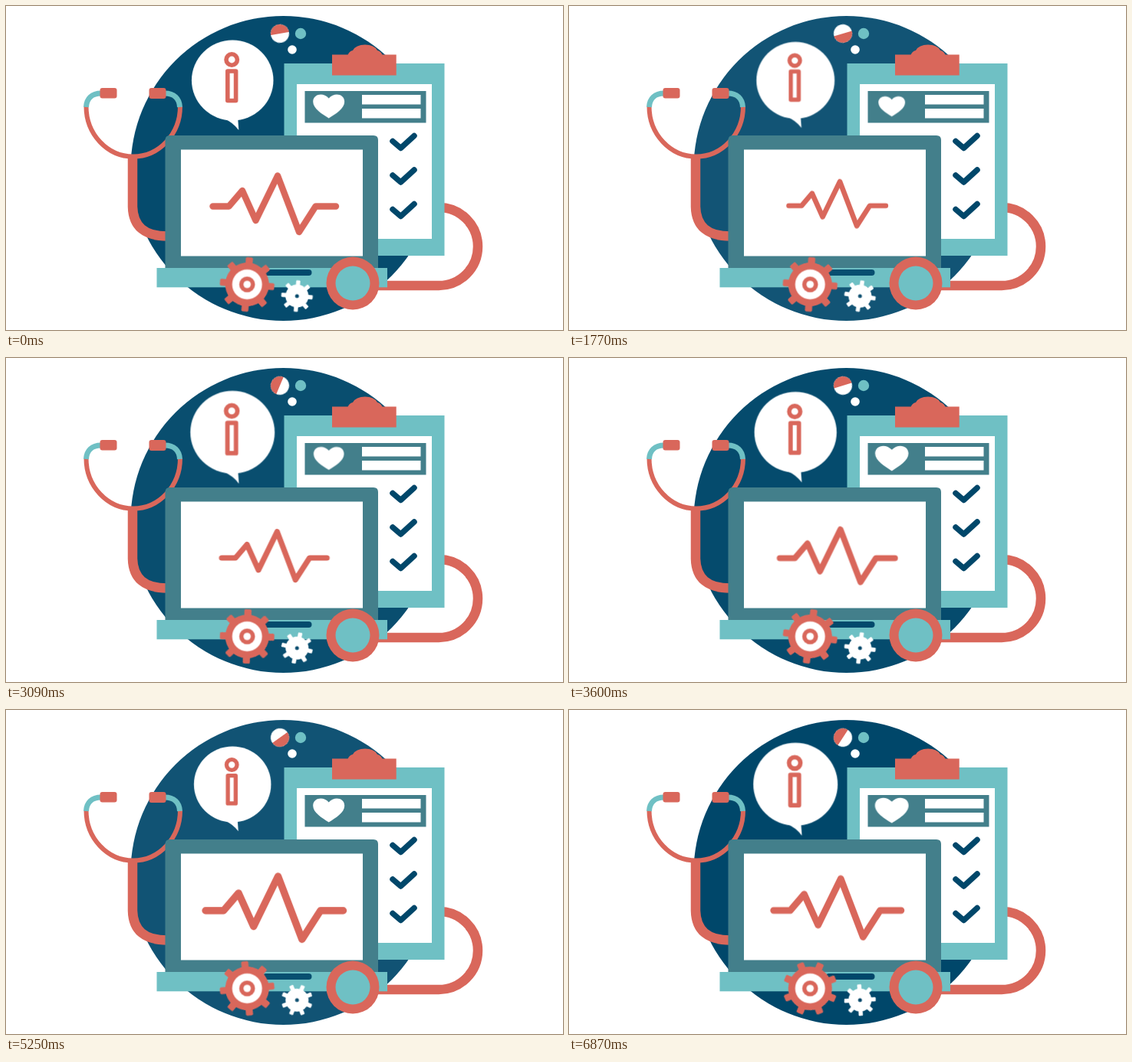
Recreate the animation shown at these times as an HTML page. Size 726 by 423 pixels, loop 6900 ms.

```html
<!DOCTYPE html>
<html lang="en">
<head>
<meta charset="utf-8">
<title>Online health check</title>
<style>
  :root {
    --navy: #00476a;
    --teal: #6fc0c4;
    --slate: #437f8b;
    --red: #d9675b;
    --loop: 6900ms;
  }
  html, body { margin: 0; width: 100%; height: 100%; overflow: hidden; background: #fff; }
  svg { display: block; width: 726px; height: 423px; }

  .navy { fill: var(--navy); }
  .teal { fill: var(--teal); }
  .slate { fill: var(--slate); }
  .red { fill: var(--red); }
  .white { fill: #fff; }
  .line { fill: none; stroke: var(--red); stroke-linecap: round; stroke-linejoin: round; }
  .tube { fill: none; stroke: var(--red); stroke-width: 12.5; }

  /* Moving parts */
  .fade { animation: fade calc(var(--loop) / 2) linear infinite; }
  .bubble { transform-origin: 295px 97px; animation: breathe var(--loop) infinite; }
  .heart { transform-origin: 420.7px 131px; animation: beat calc(var(--loop) / 9) linear infinite; }
  .pulse { transform-origin: 349.5px 258px; animation: pulse var(--loop) linear infinite; }
  .spin { animation: spin var(--loop) linear infinite; }
  .pill { --from: -10deg; --to: 666deg; }
  .big { --from: 5deg; --to: 701deg; }
  .small { --from: 5deg; --to: -681deg; }

  @keyframes spin {
    from { transform: rotate(var(--from)); }
    to { transform: rotate(var(--to)); }
  }
  @keyframes fade {
    0% { opacity: .98; }
    4.3% { opacity: .98; }
    25.2% { opacity: .896; }
    27.8% { opacity: .87; }
    52.2% { opacity: .93; }
    73.9% { opacity: .905; }
    99.1% { opacity: 1; }
    100% { opacity: .98; }
  }
  @keyframes breathe {
    0% { transform: scale(1); animation-timing-function: cubic-bezier(.3, .47, .6, 1); }
    16.7% { transform: scale(.93); animation-timing-function: cubic-bezier(.37, 0, .63, 1); }
    43.3% { transform: scale(1.032); animation-timing-function: cubic-bezier(.37, 0, .63, 1); }
    69.9% { transform: scale(.93); animation-timing-function: cubic-bezier(.37, 0, .63, 1); }
    96.4%, 100% { transform: scale(1.032); }
  }
  @keyframes beat {
    0% { transform: scale(1); }
    25.2% { transform: scale(.73); }
    32.6% { transform: scale(.88); }
    63.5% { transform: scale(1.146); }
    69.6% { transform: scale(1.06); }
    84.8% { transform: scale(1); }
    96.1% { transform: scale(1.07); }
    100% { transform: scale(1); }
  }
  @keyframes pulse {
    0% { transform: scale(1); }
    13.9% { transform: scale(.882); }
    30% { transform: scale(.752); }
    37% { transform: scale(.769); }
    52.2% { transform: scale(.935); }
    62.6% { transform: scale(1.059); }
    76.1% { transform: scale(1.118); }
    83% { transform: scale(1.13); }
    99.6%, 100% { transform: scale(1.036); }
  }
</style>
</head>
<body>
<svg viewBox="0 0 726 423">
  <defs>
    <g id="tooth"><rect x="-4.6" y="-35.5" width="9.2" height="14" rx="1.8"/></g>
    <g id="pair"><use href="#tooth"/><use href="#tooth" transform="rotate(180)"/></g>
    <g id="cross"><use href="#pair"/><use href="#pair" transform="rotate(90)"/></g>
    <g id="teeth"><use href="#cross"/><use href="#cross" transform="rotate(45)"/></g>
    <path id="check" d="M504 176.5 L514.5 185.5 L532 169.5" fill="none" stroke="#00476a"
      stroke-width="7.5" stroke-linecap="round" stroke-linejoin="round"/>
  </defs>

  <circle class="navy fade" cx="361.5" cy="212" r="199"/>

  <!-- Dots -->
  <g transform="translate(357 36)">
    <g class="spin pill">
      <circle class="white" r="12"/>
      <path class="red" d="M-12 0 A12 12 0 0 1 12 0Z"/>
    </g>
  </g>
  <circle class="teal" cx="384" cy="36" r="7.2"/>
  <circle class="white" cx="373" cy="57" r="5.8"/>

  <!-- Speech bubble -->
  <g class="bubble">
    <ellipse class="white" cx="295.2" cy="97" rx="53.3" ry="52.4"/>
    <path class="white" d="M284 147 Q296 152 303.3 162 L302 144Z"/>
    <g class="line" stroke-width="5.6">
      <circle cx="294.2" cy="70" r="7.2"/>
      <rect x="288.8" y="85" width="10.8" height="38.5"/>
    </g>
  </g>

  <!-- Stethoscope tubes -->
  <path class="tube" d="M165 197 V262 Q166 300.5 210 300.5"/>
  <path class="tube" d="M558 263 H564 A51 51 0 0 1 564 365 H480"/>
  <path class="line" stroke-width="6" style="stroke-linecap:butt"
    d="M104.5 131 A61.2 65.5 0 0 0 227 131"/>
  <g fill="none" stroke="#6fc0c4" stroke-width="7">
    <path d="M104.5 132 C105 121 112 114 124 114"/>
    <path d="M226.5 132 C226 121 219 114 207 114"/>
  </g>
  <rect class="red" x="122.5" y="107" width="22" height="13.5" rx="3"/>
  <rect class="red" x="186.5" y="107" width="22" height="14" rx="3"/>

  <!-- Clipboard -->
  <rect class="teal" x="362.5" y="75" width="209" height="251"/>
  <rect class="white" x="379" y="102" width="176" height="202"/>
  <rect class="red" x="425" y="63.5" width="83.7" height="27"/>
  <path class="red" d="M445 65 Q447 59 452 58 Q456 50.5 468 50.5 Q480 50.5 484 58 Q489 59 491 65Z"/>
  <rect class="slate" x="389.5" y="111" width="158" height="41.5"/>
  <rect class="white" x="464" y="116" width="76.5" height="12.5"/>
  <rect class="white" x="464" y="134" width="76.5" height="12.5"/>
  <path class="white heart" d="M420.7 146.5 C412 141 400.2 134 400.2 125 C400.2 114.500 414 112.500 420.7 120.500
    C427.500 112.500 441.200 114.500 441.200 125 C441.200 134 429.500 141 420.7 146.500Z"/>
  <use href="#check"/>
  <use href="#check" y="44.5"/>
  <use href="#check" y="89"/>

  <!-- Laptop -->
  <path class="slate" d="M207.500 343 V175 Q207.500 169 213.500 169 H479 Q485 169 485 175 V343Z"/>
  <rect class="white" x="228" y="187.500" width="237" height="139"/>
  <rect class="teal" x="196.500" y="342" width="300.500" height="25.300"/>
  <rect class="navy fade" x="335" y="344" width="63.500" height="8" rx="4"/>
  <path class="line pulse" stroke-width="8.400"
    d="M269.500 261.500 H290.500 L308 241 L325.500 280 L354 221.500 L382 295 L403.500 261.500 H430"/>

  <!-- Chest piece -->
  <circle class="red" cx="452" cy="362" r="34.500"/>
  <circle class="teal" cx="452" cy="362" r="22.500"/>

  <!-- Gears -->
  <g transform="translate(314.300 363.500)">
    <g class="red spin big">
      <circle r="28.500"/>
      <use href="#teeth"/>
    </g>
    <circle class="white" r="19.500"/>
    <circle class="red" r="10.300"/>
    <circle class="white" r="4.800"/>
  </g>
  <g transform="translate(379.300 378.700)">
    <g class="white spin small">
      <circle r="15"/>
      <use href="#teeth" transform="scale(.577)"/>
    </g>
    <circle class="navy fade" r="2.500"/>
  </g>
</svg>
</body>
</html>
```
